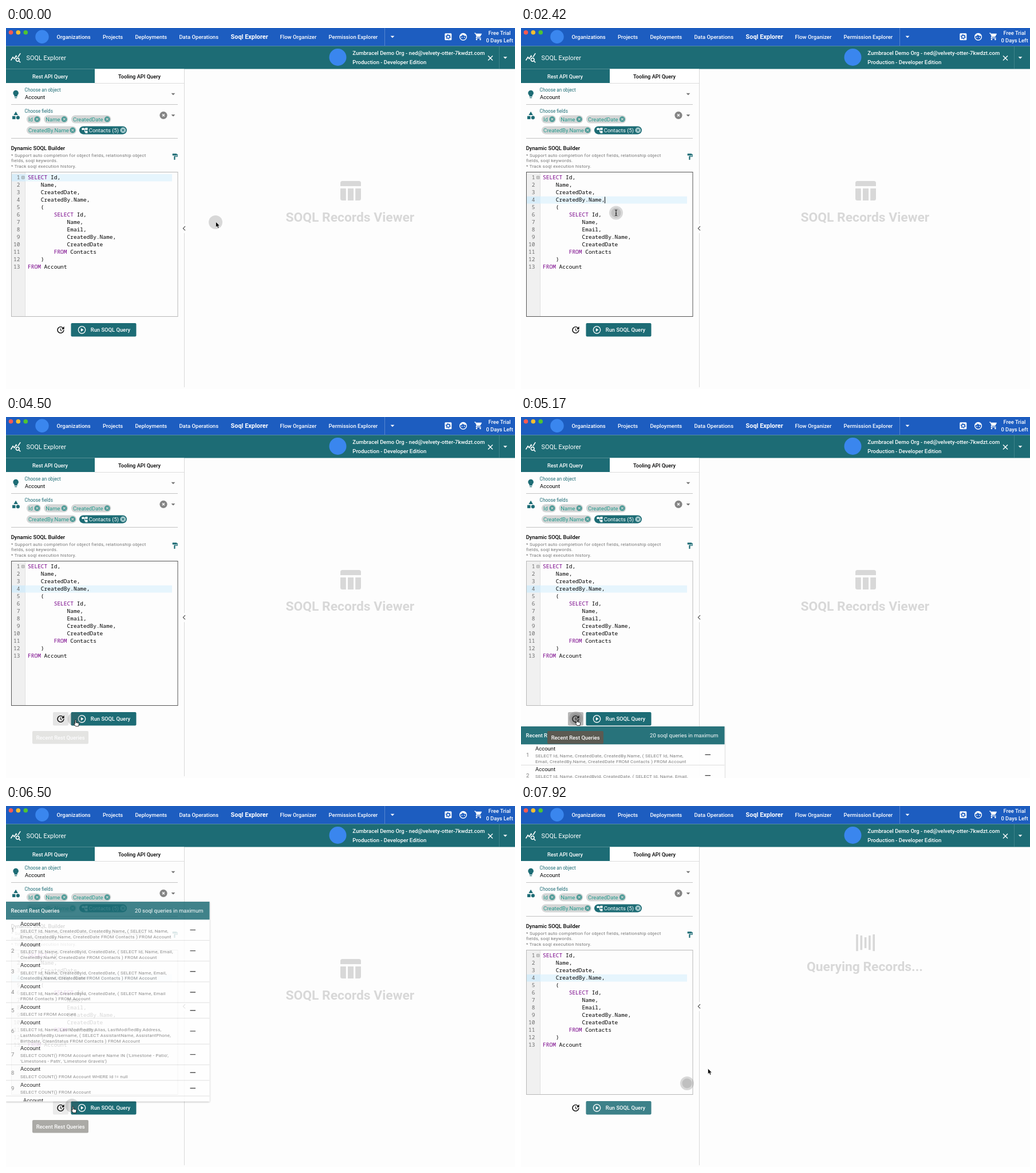
An HTML page for the animation above (8 s loop, 889 px wide and 630 px high).

```html
<!DOCTYPE html>
<html lang="en">
<head>
<meta charset="utf-8">
<title>SOQL Explorer</title>
<style>
html, body { margin: 0; width: 100%; height: 100%; overflow: hidden; background: #fdfdfd; }
svg { display: block; width: 100vw; height: 100vh; }
text { font: 9.52px Roboto, sans-serif; white-space: pre; }
.med { font-weight: 500; }
.ui { font-size: 9.4px; font-weight: 500; }
.tab { font-size: 9.25px; font-weight: 500; }
.label { font-size: 8.16px; fill: #1d6c75; }
.cap { font-size: 7.95px; letter-spacing: .0333em; fill: #757575; }
.big { font-size: 10.88px; }
.bold { font-weight: 700; }
.title { font-size: 22.85px; font-weight: 700; fill: #d8d8d8; }
.code text { font-family: "Noto Sans Mono", monospace; }
.num { fill: #6c6c6c; }
.kw { fill: #770088; }
.mid { text-anchor: middle; }
.end { text-anchor: end; }
.w { fill: #fff; }
.teal { fill: #1d6c75; }
.gray { fill: #d8d8d8; }
.dim { fill: #757575; }
.line { stroke: #c4c4c4; }
.pen { fill: none; stroke: #fff; }
</style>
</head>
<body>
<svg viewBox="0 0 889 630" preserveAspectRatio="none">
  <defs>
    <filter id="shadow" x="-5%" y="-5%" width="110%" height="110%">
      <feDropShadow dx="0" dy="1" stdDeviation="1.5" flood-opacity=".35"/>
    </filter>
    <clipPath id="panelClip"><rect y="167" width="355.5" height="348.5"/></clipPath>
    <path id="down" d="M-3.4-1.7H3.4L0 1.7z"/>
    <path id="cross" d="M-2-2L2 2M2-2L-2 2" fill="none"/>
  </defs>

  <rect width="889" height="630" fill="#fdfdfd"/>

  <g id="nav" class="w">
    <rect width="889" height="31.5" fill="#1d5dc0"/>
    <circle cx="8.5" cy="7.8" r="3.8" fill="#ff5a50"/>
    <circle cx="21.3" cy="7.8" r="3.8" fill="#f8be30"/>
    <circle cx="34.3" cy="7.8" r="3.8" fill="#4fc431"/>
    <circle cx="63" cy="15.3" r="11.7" fill="#3a86ee"/>
    <path d="M661.5 0V31.5" stroke="#5585d0"/>
    <use href="#down" x="675" y="15.5"/>
    <rect x="766.3" y="9.3" width="12" height="12" rx="1.5"/>
    <circle cx="772.3" cy="15.3" r="2.7" fill="none" stroke="#1d5dc0" stroke-width="1.6"/>
    <circle cx="772.3" cy="15.3" r="4.1" fill="none" stroke="#1d5dc0" stroke-width="1.1" stroke-dasharray="1.6 2.7"/>
    <circle cx="798.5" cy="15.3" r="5.9" class="pen" stroke-width="1.4"/>
    <path d="M793 14.3C796 14.2 797.3 12.5 797.8 11.2C799.5 13.5 801.5 14 804 13.6C803 8.3 794 8.3 793 14.3z"/>
    <circle cx="796.4" cy="16.4" r=".9"/><circle cx="800.6" cy="16.4" r=".9"/>
    <path transform="translate(817.5 7.1) scale(.64)" d="M7 18c-1.1 0-1.99.9-1.99 2S5.9 22 7 22s2-.9 2-2-.9-2-2-2zM1 2v2h2l3.6 7.59-1.35 2.45c-.16.28-.25.61-.25.96 0 1.1.9 2 2 2h12v-2H7.42c-.14 0-.25-.11-.25-.25l.03-.12.9-1.63h7.45c.75 0 1.41-.41 1.75-1.03l3.58-6.49c.08-.14.12-.31.12-.48 0-.55-.45-1-1-1H5.21l-.94-2H1zm16 16c-1.1 0-1.99.9-1.99 2s.89 2 1.99 2 2-.9 2-2-.9-2-2-2z"/>
    <text x="392.6" y="18.9" class="big bold">Soql Explorer</text>
    <text x="862" y="12" class="ui mid">Free Trial</text>
    <text x="862" y="24.5" class="ui mid">0 Days Left</text>
  </g>

  <g class="w">
    <rect y="31.5" width="889" height="40" class="teal"/>
    <path transform="translate(7 42) scale(.82)" d="M19.88 18.47c.44-.7.7-1.51.7-2.39 0-2.49-2.01-4.5-4.5-4.5s-4.5 2.01-4.5 4.5 2.01 4.5 4.49 4.5c.88 0 1.7-.26 2.39-.7L21.58 23 23 21.58l-3.12-3.11zm-3.8.11c-1.38 0-2.5-1.12-2.5-2.5s1.12-2.5 2.5-2.5 2.5 1.12 2.5 2.5-1.12 2.5-2.5 2.5zM15.72 10.08c-.74.02-1.45.18-2.1.45l-.55-.83-3.8 6.18-3.01-3.52-3.63 5.81L1 17l5-8 3 3.5L13 6l2.72 4.08zm2.59.5c-.64-.28-1.33-.45-2.05-.49L21.38 2 23 3.18l-4.69 7.4z"/>
    <text x="35.5" y="55.7" class="big">SOQL Explorer</text>
    <circle cx="579.5" cy="51" r="15" fill="#3a86ee"/>
    <text x="605.3" y="47.3" class="med">Zumbracel Demo Org - ned@velvety-otter-7kwdzt.com</text>
    <text x="605.3" y="63" class="med">Production - Developer Edition</text>
    <path d="M842 48.5l8 8m0-8l-8 8" class="pen" stroke-width="1.4"/>
    <path d="M861.5 32V71" stroke="#3f838b"/>
    <use href="#down" x="872" y="52"/>
  </g>

  <rect y="71.5" width="155" height="24.5" class="teal"/>
  <rect x="155" y="71.5" width="156" height="24.5" fill="#fff"/>
  <path d="M155 96.5H311" stroke="#dcdcdc"/>
  <path d="M311.5 72V342M311.5 358V627" stroke="#d8d8d8"/>
  <path d="M313 346l-3.6 3.7 3.6 3.7" fill="none" stroke="#555" stroke-width="1.2"/>
  <text x="77" y="87.5" class="tab mid w">Rest API Query</text>
  <text x="233" y="87.5" class="tab mid">Tooling API Query</text>

  <path class="teal" transform="translate(9 107.4) scale(.68)" d="M9 21c0 .5.4 1 1 1h4c.6 0 1-.5 1-1v-1H9v1zm3-19C8.1 2 5 5.1 5 9c0 2.4 1.2 4.5 3 5.7V17c0 .5.4 1 1 1h6c.6 0 1-.5 1-1v-2.3c1.8-1.3 3-3.4 3-5.7 0-3.9-3.1-7-7-7z"/>
  <text x="32.6" y="110.8" class="label">Choose an object</text>
  <text x="33" y="124.3">Account</text>
  <use href="#down" x="292" y="115.5" class="dim"/>
  <path id="objectLine" d="M9 133.5H300" class="line"/>

  <g class="teal" transform="translate(9 144.5) scale(.68)">
    <path d="M12 2l-5.5 9h11z"/><circle cx="17.5" cy="17.5" r="4.5"/><path d="M3 13.5h8v8H3z"/>
  </g>
  <text x="32.6" y="147.9" class="label">Choose fields</text>
  <circle cx="275" cy="152.3" r="6.6" fill="#858585"/>
  <use href="#cross" x="275" y="152.3" stroke="#fff" stroke-width="1.3"/>
  <use href="#down" x="292" y="152.7" class="dim"/>
  <g id="chips"></g>
  <path id="fieldLine" d="M9 192.5H300" class="line"/>

  <text x="8.7" y="212.9" class="ui">Dynamic SOQL Builder</text>
  <text x="9" y="225.3" class="cap">* Support auto completion for object fields, relationship object</text>
  <text x="9" y="234.4" class="cap">fields, soql keywords.</text>
  <text x="9" y="244.2" class="cap">* Track soql execution history.</text>
  <path class="teal" transform="translate(288.5 218.2) scale(.54)" d="M18 4V3c0-.55-.45-1-1-1H5c-.55 0-1 .45-1 1v4c0 .55.45 1 1 1h12c.55 0 1-.45 1-1V6h1v4H9v11c0 .55.45 1 1 1h2c.55 0 1-.45 1-1v-9h8V4h-3z"/>

  <rect x="10" y="252" width="23.5" height="251" fill="#f0f0f0"/>
  <path d="M33.5 252V503" stroke="#e0e0e0"/>
  <g id="activeLine">
    <rect x="10" y="255" width="24" height="12.6" fill="#d7ecf8"/>
    <rect x="34" y="255" width="256" height="12.6" fill="#e6f5fd"/>
  </g>
  <g id="code" class="code"></g>
  <path d="M27.7 258.7h4.2v4.4h-4.2zM28.5 260.9h2.6" fill="none" stroke="#777" stroke-width=".7"/>
  <path id="caret" d="M146.6 294.5v11.5" stroke="#000"/>
  <rect id="editor" x="9.5" y="251.5" width="290.5" height="252" fill="none"/>

  <rect id="historyBg" x="82" y="515" width="27" height="23.5" rx="2"/>
  <path transform="translate(87.3 518.8) scale(.68)" d="M21 10.12h-6.78l2.74-2.82c-2.73-2.7-7.15-2.8-9.88-.1-2.73 2.71-2.73 7.08 0 9.79s7.15 2.71 9.88 0C18.32 15.65 19 14.08 19 12.1h2c0 1.98-.88 4.55-2.64 6.29-3.51 3.48-9.21 3.48-12.72 0-3.5-3.47-3.53-9.11-.02-12.58s9.14-3.47 12.65 0L21 3v7.12zM12.5 8v4.25l3.5 2.08-.72 1.21L11 13V8h1.5z"/>
  <rect x="113.5" y="515" width="114" height="23.5" rx="2" class="teal"/>
  <rect id="runTint" x="113.5" y="515" width="114" height="23.5" rx="2" class="w"/>
  <circle cx="132.5" cy="526.8" r="6.2" class="pen" stroke-width="1.3"/>
  <path d="M130.8 523.7v6.2l4.7-3.1z" class="w"/>
  <text x="147.8" y="530.2" class="ui w">Run SOQL Query</text>

  <g id="idle">
    <path class="gray" d="M584 276v-5.5q0-3.5 3.5-3.5h29q3.5 0 3.5 3.5V276zM584 280h9.8v21h-6.3q-3.5 0-3.5-3.5zM597 280h10v21h-10zM610.2 280h9.8v17.5q0 3.5-3.5 3.5h-6.3z"/>
    <text x="600.8" y="338.3" class="title mid">SOQL Records Viewer</text>
  </g>
  <g id="busy">
    <g id="bars" class="gray"></g>
    <text x="600.5" y="287.5" class="title mid">Querying Records...</text>
  </g>

  <g id="panel">
    <rect y="167" width="355.5" height="348.5" fill="#fff" filter="url(#shadow)"/>
    <g clip-path="url(#panelClip)">
      <rect y="167" width="356" height="31.3" class="teal"/>
      <text x="8.6" y="186.2" class="ui w">Recent Rest Queries</text>
      <text x="344.5" y="186.2" class="w end">20 soql queries in maximum</text>
      <g id="rows"></g>
    </g>
  </g>
  <g id="tip">
    <rect x="46" y="548" width="98" height="22.6" rx="2" fill="#5c5a52"/>
    <text x="95.2" y="562.7" class="ui mid w">Recent Rest Queries</text>
  </g>

  <g id="halo">
    <circle r="12" fill="#555" opacity=".22"/>
    <circle id="press" r="8.5" fill="#555" opacity=".18"/>
  </g>
  <g id="pointer">
    <path id="arrow" d="M.5-.8V8.8L2.7 6.8 4.2 10.2 5.9 9.5 4.5 6.2H7.3z" stroke="#fff" stroke-width=".6"/>
    <path id="beam" d="M-2-5Q0-5 0-3.8Q0-5 2-5M0-4V4.5M-2 5Q0 5 0 3.8Q0 5 2 5M-1 1H1" fill="none" stroke="#000" stroke-width=".9"/>
    <path id="hand" d="M.7 2.2c0-1.4 1.8-1.4 1.8 0V6l3.9.8c1 .2 1.4.9 1.2 1.9L7 12.5H2L-1 8.6c-.6-.9.5-1.6 1.2-.8l.5.6z" fill="#fff" stroke="#111" stroke-width=".9"/>
  </g>
</svg>
<script>
(() => {
const $ = id => document.getElementById(id);
const text = (x, y, s, cls = '') => `<text x="${x}" y="${y}" class="${cls}">${s}</text>`;

const menu = [[88.5, 'Organizations'], [169, 'Projects'], [225.4, 'Deployments'], [302.4, 'Data Operations'],
  [478.5, 'Flow Organizer'], [563.5, 'Permission Explorer']];
$('nav').insertAdjacentHTML('beforeend', menu.map(([x, s]) => text(x, 18.8, s, 'med')).join(''));

function chip(x, right, y, label, dark) {
  const fill = dark ? '#1d6c75' : '#d4d6d6', dot = dark ? '#a9cdd0' : '#4a9a96';
  const icon = dark ? `<path d="M132.5 ${y - 4}h4v3.5h-4zM138.5 ${y - 4.5}h4v4h-4zM138.5 ${y + 1}h4v4h-4z" fill="#fff"/>
    <path d="M136 ${y - 2.5}h3M137.5 ${y - 2.5}v5.5h1.5" class="pen"/>` : '';
  return `<rect x="${x}" y="${y - 7}" width="${right - x}" height="14" rx="7" fill="${fill}"/>${icon}
    <text x="${dark ? 144.7 : x + 3}" y="${y + 3.7}" fill="${dark ? '#fff' : '#23998c'}">${label}</text>
    <circle cx="${right - 6.6}" cy="${y}" r="4.9" fill="${dot}"/>
    <use href="#cross" x="${right - 6.6}" y="${y}" stroke="${fill}" stroke-width="1.1"/>`;
}
$('chips').innerHTML = chip(36, 61, 159.2, 'Id') + chip(66.3, 108.3, 159.2, 'Name') +
  chip(114, 183.4, 159.2, 'CreatedDate') + chip(36, 123, 178.4, 'CreatedBy.Name') +
  chip(128, 211, 178.4, 'Contacts (5)', true);

const LINE = 12.96;
const code = `SELECT Id,
    Name,
    CreatedDate,
    CreatedBy.Name,
    (
        SELECT Id,
            Name,
            Email,
            CreatedBy.Name,
            CreatedDate
        FROM Contacts
    )
FROM Account`;
$('code').innerHTML = code.split('\n').map((s, i) => {
  const y = 264.2 + i * LINE, body = s.trimStart();
  return text(24.5, y, i + 1, 'num end') + text(38 + (s.length - body.length) * 5.712, y,
    body.replace(/SELECT|FROM/, '<tspan class="kw">$&</tspan>'));
}).join('');

const queries = [
  ['SELECT Id, Name, CreatedDate, CreatedBy.Name, ( SELECT Id, Name,', 'Email, CreatedBy.Name, CreatedDate FROM Contacts ) FROM Account'],
  ['SELECT Id, Name, CreatedById, CreatedDate, ( SELECT Id, Name, Email,', 'CreatedBy.Name, CreatedDate FROM Contacts ) FROM Account'],
  ['SELECT Id, Name, CreatedById, CreatedDate, ( SELECT Name, Email,', 'CreatedBy.Name, CreatedDate FROM Contacts ) FROM Account'],
  ['SELECT Id, Name, CreatedById, CreatedDate, ( SELECT Name, Email', 'FROM Contacts ) FROM Account'],
  ['SELECT Id FROM Account'],
  ['SELECT Id, Name, LastModifiedBy.Alias, LastModifiedBy.Address,', 'LastModifiedBy.Username, ( SELECT AssistantName, AssistantPhone,', 'Birthdate, CleanStatus FROM Contacts ) FROM Account'],
  ["SELECT COUNT() FROM Account where Name IN ('Limestone - Patio',", "'Limestones - Path', 'Limestone Gravels')"],
  ['SELECT COUNT() FROM Account WHERE Id != null'],
  ['SELECT COUNT() FROM Account'],
];
let rowTop = 198.3;
$('rows').innerHTML = queries.map((lines, i) => {
  const y = rowTop, height = 18.2 + 9 * lines.length, mid = y + height / 2;
  rowTop += height;
  return text(9, mid + 3.2, i + 1, 'dim') + text(25, y + 10.6, 'Account') +
    lines.map((s, j) => text(25, y + 22.8 + 9.7 * j, s, 'cap')).join('') +
    `<path d="M321.5 ${mid}h9.5" stroke="#333" stroke-width="1.4"/><path d="M0 ${rowTop}H356" stroke="#dcdcdc"/>`;
}).join('') + text(30, rowTop + 10.6, 'Account');

$('bars').innerHTML = [0, 1, 2, 3, 4].map(i => `<rect x="${585.2 + i * 7.29}" width="3.64"/>`).join('');
const bars = [...$('bars').children];

// Each track lists [step, value, ...] points, eased between neighbours.
function track(step, points) {
  const i = points.findIndex(p => p[0] > step);
  if (i < 0) return points[points.length - 1].slice(1);
  if (i === 0) return points[0].slice(1);
  const a = points[i - 1], b = points[i], u = (step - a[0]) / (b[0] - a[0]), k = u * u * (3 - 2 * u);
  return a.slice(1).map((v, j) => v + (b[j + 1] - v) * k);
}
const mouse = [[2, 366, 339], [8, 328, 17], [12, 225, 123], [17, 213, 164.5], [18, 213, 164.5], [24, 165, 301],
  [27, 165, 301], [37, 175, 507], [39, 173, 523], [43, 171, 530], [49, 171, 530], [57, 96, 526], [75, 96, 526],
  [83, 157, 516], [84, 157, 516], [88, 164, 520], [94, 164, 520], [95, 326, 459]];
const runTint = [[37, 0], [39, .05], [42, .1], [50, .1], [54, 0], [79, 0], [83, .08], [89, .08], [91, .14]];
const historyTint = [[52, 0], [55, .13], [59, .13], [61, .28], [63, .26], [66, .15], [76, .15], [80, 0]];
const panelFade = [[59, 0], [62, .95], [63, 1], [77, 1], [81, 0]];
const tipFade = [[53, 0], [57, .95], [63, 1], [76, 1], [80, 0]];

const within = (v, ...spans) => spans.some(([a, b]) => v >= a && v < b);
const show = (id, on) => $(id).setAttribute('visibility', on ? 'visible' : 'hidden');
const fade = (id, points, step) => $(id).setAttribute('opacity', track(step, points)[0]);
const move = (id, x, y) => $(id).setAttribute('transform', `translate(${x} ${y})`);

function barHeight(seconds) {
  if (seconds < 0) return 120;
  const u = seconds % 1 * 10;
  if (u < 8) return 120 - 10 * u;
  return u < 9 ? 40 + 100 * (u - 8) : 140 - 20 * (u - 9);
}

const FRAME = 1000 / 12;
function draw(now) {
  const step = Math.floor(now % 8000 / FRAME);
  const [x, y] = track(step, mouse);
  const away = step >= 95;

  // The halo trails behind on the last quick move.
  move('pointer', x, y);
  move('halo', away ? 290 : x, away ? 484 : y);
  show('arrow', step < 12 || away);
  show('beam', within(step, [12, 37]));
  show('hand', within(step, [37, 95]));
  show('press', within(step, [28, 30], [60, 64], [89, 96]));

  $('objectLine').style.stroke = step === 12 ? '#333' : '';
  $('fieldLine').style.stroke = within(step, [14, 21]) ? '#222' : '';
  $('editor').setAttribute('stroke', within(step, [29, 61]) ? '#555' : '#b8b8b8');
  move('activeLine', 0, step >= 29 ? LINE * 3 : 0);
  show('caret', within(step, [29, 36], [43, 50], [56, 60]));

  fade('runTint', runTint, step);
  fade('historyBg', historyTint, step);
  fade('panel', panelFade, step);
  move('panel', 0, step < 64 ? 373 : 0);
  fade('tip', tipFade, step);

  const busy = step >= 90;
  show('idle', !busy);
  show('busy', busy);
  bars.forEach((bar, i) => {
    const h = barHeight((step - 90) / 12 - Math.abs(i - 2) * .25) * .243;
    bar.setAttribute('height', h);
    bar.setAttribute('y', 238.6 - h / 2);
  });
}

const start = performance.now();
function tick() {
  draw(performance.now() - start);
  requestAnimationFrame(tick);
}
tick();
})();
</script>
</body>
</html>
```
